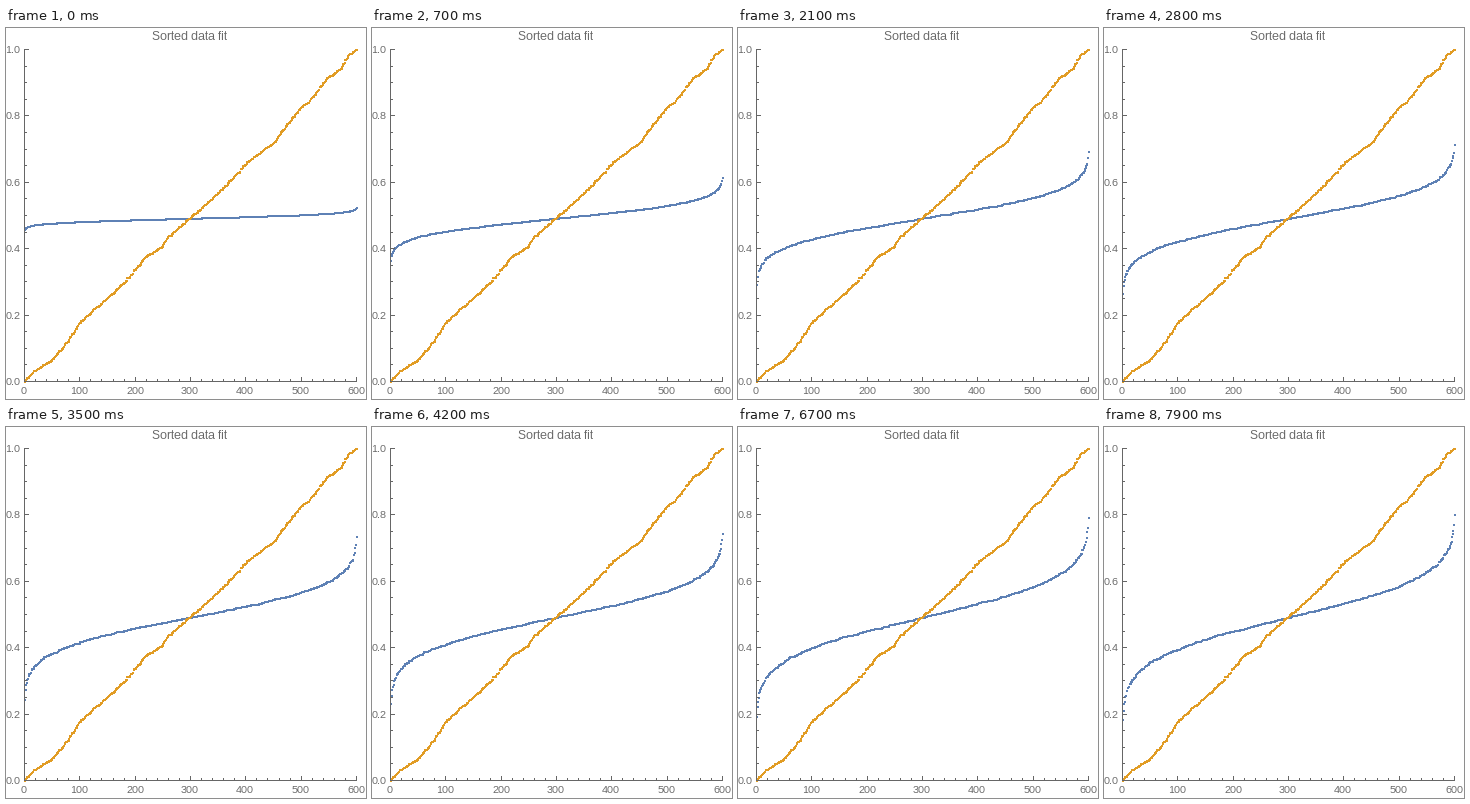
Write a matplotlib script that moves like this. It is 360 px wide and 371 px high and loops after 8000 ms.

```python
import numpy as np
import matplotlib.pyplot as plt
from matplotlib.animation import FuncAnimation
from matplotlib.patches import Rectangle

W, H, DPI = 360, 371, 64
X0, Y0, SPAN = 18, 353, 332
COUNT, FRAMES = 600, 80
BLUE, ORANGE, GRAY = "#5e81b5", "#e19c24", "#666666"

# Full hinting keeps the small labels on the pixel grid
plt.rcParams.update({"text.hinting": "native", "text.hinting_factor": 1})

fig = plt.figure(figsize=(W / DPI, H / DPI), dpi=DPI, facecolor="white")
ax = fig.add_axes([0, 0, 1, 1])
ax.set_xlim(0, W)
ax.set_ylim(H, 0)
ax.axis("off")


def px(i):
    return X0 + 0.5 + np.asarray(i) * SPAN / COUNT


def py(v):
    return Y0 + 0.5 - np.asarray(v) * SPAN


def bar(x, y, w, h):
    ax.add_patch(Rectangle((x, y), w, h, fc=GRAY, lw=0, aa=False, zorder=4))


def label(x, y, text, size, ha="center"):
    ax.text(x, y, text, fontsize=size * 72 / DPI, family="Liberation Sans",
            color=GRAY, ha=ha, va="baseline")


def dots(values, color, z):
    return ax.plot(px(index), py(values), ls="", marker="s", ms=2 * 72 / DPI,
                   mew=0, color=color, zorder=z)[0]


# Axes, ticks and labels
bar(X0, Y0 - SPAN, 1, SPAN + 1)
bar(X0, Y0, SPAN + 1, 1)
for n in range(0, COUNT + 1, 20):
    size = 2 if n % 100 else 4
    x = int(px(n))
    bar(x, Y0 - size, 1, size)
    if n % 100 == 0:
        label(x, 366, str(n), 10)
for n in range(21):
    size = 2 if n % 4 else 4
    y = int(py(n / 20))
    bar(X0 + 1, y, size, 1)
    if n % 4 == 0:
        label(14.5, y + 4, f"{n / 20:.1f}", 10, "right")
label(184, 12, "Sorted data fit", 12)

index = np.arange(1, COUNT + 1)

# Sorted uniform sample: a bent diagonal, roughened and sorted again
bends = [(0, 0), (20, .033), (50, .064), (72, .105), (100, .175), (180, .295),
         (220, .375), (250, .405), (258, .43), (300, .492), (350, .565),
         (400, .655), (452, .722), (500, .825), (515, .84), (545, .91),
         (572, .94), (585, .98), (600, 1)]
noise = np.random.default_rng(4).normal(0, 0.003, COUNT)
sample = np.sort(np.interp(index, *zip(*bends)) + noise)
dots(np.clip(sample, 0, 1), ORANGE, 2)

# Normal quantiles in Tukey's lambda form
p = (index - 0.5) / COUNT
quantiles = (p ** 0.1349 - (1 - p) ** 0.1349) / 0.1975


def fit(k):
    # Variance of a damped random walk, levelling off with time
    spread = np.sqrt(0.013 * (1 - np.exp(-(k + 0.5) / 56)))
    noise = np.random.default_rng(k).normal(0, 0.04, COUNT)
    return 0.49 + spread * np.sort(quantiles + noise)


blue = dots(fit(0), BLUE, 1)


def draw(k):
    blue.set_ydata(py(fit(k)))
    return [blue]


anim = FuncAnimation(fig, draw, frames=FRAMES, interval=100, repeat=True,
                     repeat_delay=0, blit=False)
plt.show()
```
